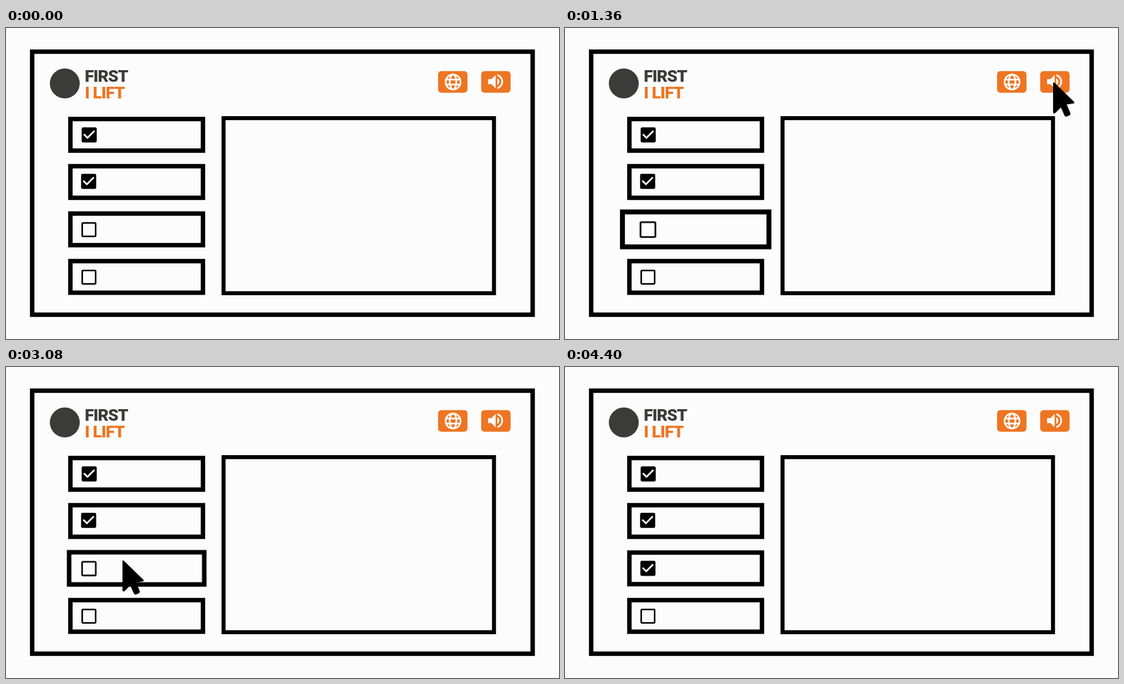
An HTML page for the animation above (8 s loop, 997x561 px).

```html
<!DOCTYPE html>
<html lang="en">
<head>
<meta charset="utf-8">
<title>Checklist</title>
<style>
  html, body { margin: 0; width: 100%; height: 100%; overflow: hidden; background: #fcfcfc; }
  svg { display: block; width: 100%; height: 100%; }
  .frame { fill: none; stroke: #000; stroke-width: 8; }
  .panel { stroke-width: 7.2; }
  .name { font: 900 30px Roboto, "Liberation Sans", sans-serif; letter-spacing: -1px; }

  .pulse, .cursor, .tick, .empty { animation: 8s linear infinite; }
  .pulse { transform-box: view-box; animation-name: pulse; }
  .pulse.row { transform-origin: 235.6px 363.2px; }
  .pulse.box { transform-origin: 149.5px 363.7px; }
  .cursor { animation-name: travel; }
  .tick, .empty { animation-timing-function: step-end; }
  .tick { animation-name: show; }
  .empty { animation-name: hide; }

  @keyframes pulse {
    0%, 0.2%, 12.7%, 24.85%, 37.7%, 50.2%, 100% { transform: scale(1); }
    6.45%, 18.775%, 43.95% { transform: scale(1.148); }
  }
  @keyframes travel {
    0%, 12.75% { transform: translate(1017px, 46px); }
    37.85%, 50.3% { transform: translate(210px, 348px); }
    56.25%, 100% { transform: translate(-137px, 475px); }
  }
  @keyframes show {
    0% { opacity: 0; }
    43.8%, 100% { opacity: 1; }
  }
  @keyframes hide {
    0% { opacity: 1; }
    43.8%, 100% { opacity: 0; }
  }
</style>
</head>
<body>
<svg viewBox="0 0 997 561">
  <defs>
    <rect id="row" class="frame" width="239" height="57"/>
    <rect id="blank" x="1.4" y="1.4" width="24.2" height="24.2" rx="1.6" fill="none" stroke="#000" stroke-width="2.8"/>
    <g id="checked">
      <rect width="27.2" height="27.2" rx="3"/>
      <path transform="scale(1.5) translate(-3 -3)" fill="#fff" d="M10 17 5 12l1.41-1.41L10 14.17l7.59-7.59L19 8z"/>
    </g>
    <rect id="button" width="53" height="39" rx="6" fill="#ee7522"/>
  </defs>

  <rect class="frame" x="47.2" y="42.7" width="902.3" height="474.5"/>
  <rect class="frame panel" x="392.2" y="162.6" width="487.6" height="315.8"/>

  <circle cx="106" cy="100" r="27" fill="#3b3b3a"/>
  <text class="name" x="142" y="97" fill="#3b3b3a">FIRST</text>
  <text class="name" x="142" y="126.5" fill="#ee7522">I LIFT</text>

  <use href="#button" x="779" y="77.8"/>
  <g transform="translate(788 79.4) scale(1.5)" fill="none" stroke="#fff" stroke-width="2">
    <circle cx="12" cy="12" r="9"/>
    <ellipse cx="12" cy="12" rx="4" ry="9"/>
    <path d="M4 9h16M4 15h16"/>
  </g>
  <use href="#button" x="856.7" y="77.8"/>
  <path transform="translate(864.7 78.7) scale(1.5)" fill="#fff" d="M3 9v6h4l5 5V4L7 9H3zm13.5 3c0-1.77-1.02-3.29-2.5-4.03v8.05c1.48-.73 2.5-2.25 2.5-4.02zM14 3.23v2.06c2.89.86 5 3.54 5 6.71s-2.11 5.85-5 6.71v2.06c4.01-.91 7-4.49 7-8.77s-2.99-7.86-7-8.77z"/>

  <use href="#row" x="116.1" y="164.2"/>
  <use href="#checked" x="136.4" y="179.2"/>
  <use href="#row" x="116.1" y="249.3"/>
  <use href="#checked" x="135.4" y="263"/>
  <use href="#row" x="116.1" y="420.5"/>
  <use href="#blank" x="136" y="436"/>

  <g class="pulse row"><use href="#row" x="116.1" y="334.7"/></g>
  <g class="empty">
    <g class="pulse box"><use href="#blank" x="136" y="350.2"/></g>
  </g>
  <use class="tick" href="#checked" x="135.9" y="349.6"/>

  <path class="cursor" d="M0 2Q.5-.5 3 2L38 36Q39.5 38.5 36 39L24.5 40.5 31 56Q32 59 29 60.5L24 62.5Q21.5 63 20.5 60.5L14 46 4 56Q0 58.5 0 54Z"/>
</svg>
</body>
</html>
```
